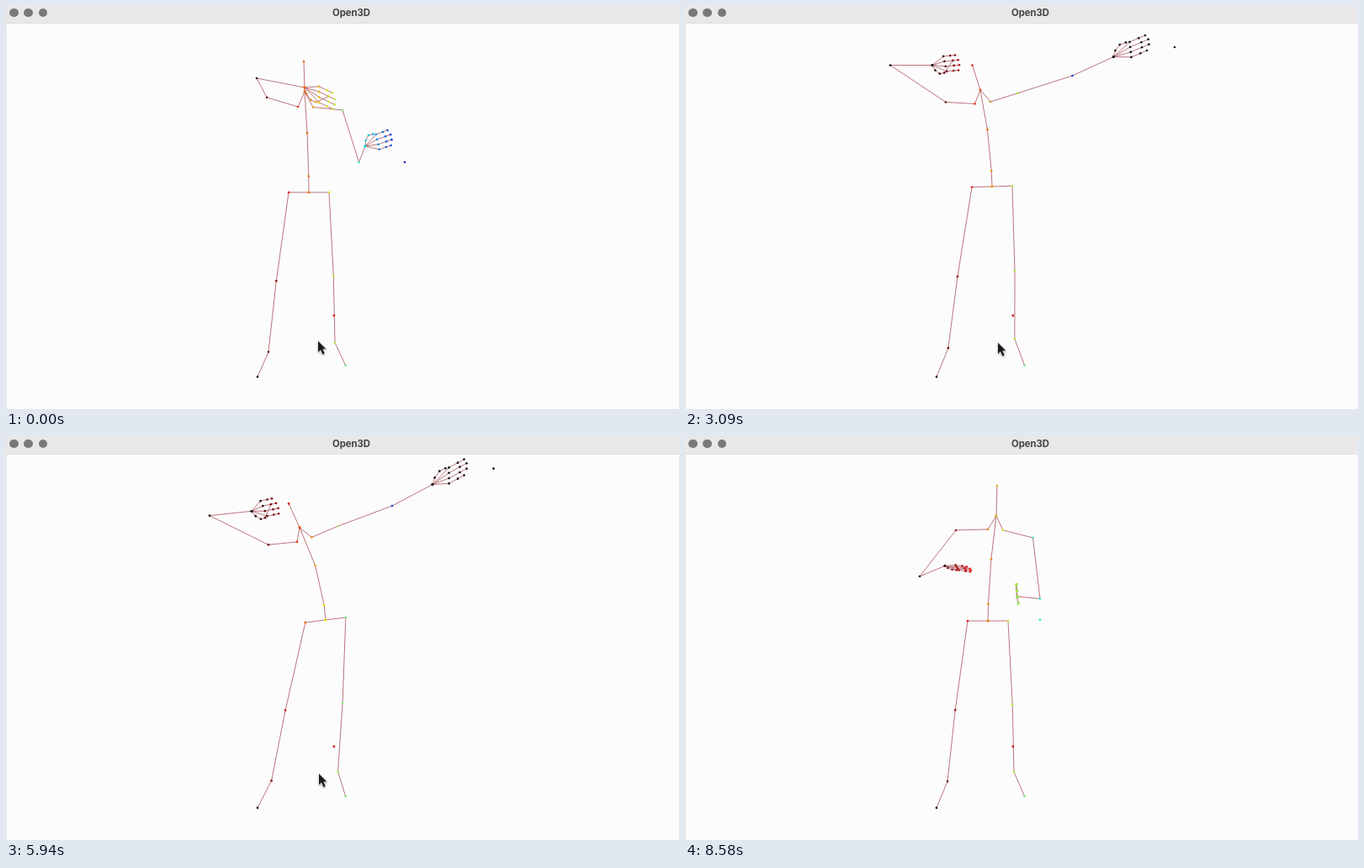
An HTML page with a canvas that plays this animation: 800 px wide and 480 px high, repeating every 8610 ms.

```html
<!DOCTYPE html>
<html lang="en">
<head>
<meta charset="utf-8">
<title>Skeleton viewer</title>
<style>
html, body { margin: 0; width: 100%; height: 100%; overflow: hidden; background: #fcfcfc; }
#stage { position: relative; width: 800px; height: 480px; overflow: hidden; }
canvas { position: absolute; left: 0; top: 0; }
#bar { position: absolute; left: 0; top: 0; width: 800px; height: 20px; background: #e9e7e7; border-bottom: 1px solid #e0dede; }
#bar i { position: absolute; top: 2.6px; width: 10.8px; height: 10.8px; border-radius: 50%; background: #7a7878; }
#bar b { position: absolute; left: 310px; width: 201px; top: 0; text-align: center; font: bold 11.3px/16px Inter, Roboto, sans-serif; color: #434242; }
#edge { position: absolute; left: 0; top: 21px; width: 1px; height: 459px; background: #e6e6e6; }
#cursor { position: absolute; filter: drop-shadow(0 1px 1px rgba(0,0,0,.35)); overflow: visible; }
</style>
</head>
<body>
<div id="stage">
  <canvas id="view" width="800" height="480"></canvas>
  <div id="edge"></div>
  <svg id="cursor" width="12" height="18"><path d="M0 0V13.2L3 10.5L5.4 16L7.8 15L5.4 9.6H9.5Z" fill="#1c1c1c" stroke="#fff" stroke-width="1" paint-order="stroke"/></svg>
  <div id="bar"><i style="left:4px"></i><i style="left:21.3px"></i><i style="left:38.5px"></i><b>Open3D</b></div>
</div>
<script>
const LOOP = 8610, STEP = 30;
const ctx = document.getElementById('view').getContext('2d');
const cursor = document.getElementById('cursor');

// A pose holds the trunk, both arms from collar to wrist (the right one ends in
// a loose marker) and each hand as its finger vector and its half width.
const start = {
  head: [354, 66], neck: [355, 102], pelvis: [360, 222],
  left: [[347, 120], [310, 109], [298, 86], [355, 97]], leftHand: [[33, 16], [0, 9.5]],
  right: [[365, 120.5], [400, 124], [419.5, 186], [427, 167], [474, 186]], rightHand: [[28.5, -10], [-2, -9]]
};
const raised = {
  head: [345, 63], neck: [352, 88], pelvis: [359, 211],
  left: [[344, 104], [310, 86], [301, -5], [330, -35]], leftHand: [[29, -3], [2, 9]],
  right: [[363, 104], [392, 86], [452, 40], [488, 0], [545, -45]], rightHand: [[38, -22], [0, -9]]
};
const wide = {
  head: [341.5, 70.5], neck: [351, 100], pelvis: [365, 215],
  left: [[344.5, 116.5], [310, 114.5], [244, 70.5], [294, 70.5]], leftHand: [[29, -3], [2, 9]],
  right: [[363, 114], [395, 104], [460.5, 83], [509.5, 60.5], [582, 49]], rightHand: [[38.5, -16.5], [-1, -9]]
};
const leaning = {
  head: [336, 79.5], neck: [349, 108], pelvis: [380, 218],
  left: [[346, 125], [312, 128.5], [242, 94], [292, 88.5]], leftHand: [[28, -6], [4, 9]],
  right: [[363.5, 119.5], [395, 106], [459, 82], [507, 56.5], [579.5, 37.5]], rightHand: [[37.5, -20.5], [0, -9.5]]
};
const lowered = {
  head: [371, 58], neck: [370, 94], pelvis: [360, 219],
  left: [[360, 110], [322, 111], [279, 166], [309, 153.5]], leftHand: [[28, 4], [2, 3]],
  right: [[378, 111], [413.5, 120], [422, 192.5], [394.5, 190], [422, 217.5]], rightHand: [[1, -4], [-1, -11]]
};

const smooth = s => s * s * (3 - 2 * s);
const settle = s => 1 - (1 - s) ** 3;
const moves = [
  { from: start, to: raised, t0: 0, t1: 1850, ease: smooth },
  { from: raised, to: wide, t0: 1850, t1: 3090, ease: smooth },
  { from: wide, to: leaning, t0: 3090, t1: 6790, ease: settle },
  { from: leaning, to: lowered, t0: 7020, t1: 8160, ease: smooth }
];

const mix = (a, b, k) => a + (b - a) * k;
const mixPoint = (p, q, k) => [mix(p[0], q[0], k), mix(p[1], q[1], k)];
const add = (p, q, k = 1) => [p[0] + q[0] * k, p[1] + q[1] * k];
const sub = (p, q) => add(p, q, -1);
const clamp = v => Math.max(0, Math.min(1, v));

// Turns one vector into another by angle and length, the short way round.
function swing(u, v, k) {
  const a = Math.atan2(u[1], u[0]), d = Math.atan2(v[1], v[0]) - a;
  const ang = a + Math.atan2(Math.sin(d), Math.cos(d)) * k;
  const len = mix(Math.hypot(...u), Math.hypot(...v), k);
  return [len * Math.cos(ang), len * Math.sin(ang)];
}

function arm(side, from, to, k, neck) {
  let p = neck;
  return from[side].map((q, i) => {
    const u = sub(q, from[side][i - 1] || from.neck);
    const v = sub(to[side][i], to[side][i - 1] || to.neck);
    return p = add(p, swing(u, v, k));
  });
}

function line(...pts) {
  ctx.beginPath();
  pts.forEach(p => ctx.lineTo(...p));
  ctx.stroke();
}

// Points take the jet colour map from left to right.
function dot([x, y]) {
  const v = 4 * (.88 - (x - 337) * .0058);
  const rgb = [3, 2, 1].map(peak => Math.round(20 + 210 * clamp(1.5 - Math.abs(v - peak))));
  ctx.fillStyle = `rgb(${rgb})`;
  ctx.beginPath();
  ctx.arc(x, y, 1.35, 0, 7);
  ctx.fill();
}

function chain(...pts) {
  line(...pts);
  pts.forEach(dot);
}

function hand(wrist, [along, across], linked) {
  const spot = (a, c) => add(add(wrist, along, a), across, c);
  const thumb = [spot(.07, .7), spot(.22, 1.2), spot(.41, 1.15)];
  const fingers = [1, 1 / 3, -1 / 3, -1].map(c => {
    const reach = 1.09 - .09 * c * c;
    return [.52, .8 * reach, reach].map(a => spot(a, c));
  });
  if (linked) line(thumb[2], fingers[2][1]);
  [thumb, ...fingers].forEach(f => chain(wrist, ...f));
}

// The legs follow the pelvis while the toes stay planted.
function leg(pelvis, side, ankleX, ankleY, toe) {
  const shift = pelvis[0] - 360;
  const hip = add(pelvis, [24, -.15 * shift], side);
  const ankle = [ankleX + .18 * shift, ankleY + .65 * (pelvis[1] - 222)];
  const knee = add(mixPoint(hip, ankle, .555), [1.4 * side, 0]);
  chain(pelvis, hip, knee, ankle, toe);
}

function trunk(head, neck, pelvis) {
  const bow = (pelvis[0] - neck[0]) / 5;
  const spine = [.41, .84].map(s => add(mixPoint(neck, pelvis, s), [4 * s * (1 - s) * bow, 0]));
  chain(head, neck, ...spine, pelvis);
}

function draw(t) {
  const { from, to, t0, t1, ease } = moves.findLast(m => t >= m.t0);
  const k = ease(clamp((t - t0) / (t1 - t0)));
  const [head, neck, pelvis] = ['head', 'neck', 'pelvis'].map(n => mixPoint(from[n], to[n], k));
  const [leftHand, rightHand] = ['leftHand', 'rightHand'].map(n =>
    from[n].map((p, i) => mixPoint(p, to[n][i], k)));
  const left = arm('left', from, to, k, neck);
  const right = arm('right', from, to, k, neck);
  const marker = right.pop();

  ctx.clearRect(0, 0, 800, 480);
  ctx.strokeStyle = '#ba747b';
  trunk(head, neck, pelvis);
  leg(pelvis, -1, 312, 412, [299, 441.7]);
  leg(pelvis, 1, 391, 401, [403.6, 428]);
  chain(neck, ...left);
  chain(neck, ...right);
  hand(left[3], leftHand, true);
  hand(right[3], rightHand, false);
  dot(marker);
  ctx.fillStyle = '#d31c1c';
  ctx.fillRect(388.6, 367.4, 2.5, 2.5);

  const moved = t >= 600;
  cursor.style.left = (moved ? 372 : 370.5) + 'px';
  cursor.style.top = (moved ? 401 : 399) + 'px';
  cursor.style.visibility = t < 6000 ? 'visible' : 'hidden';
}

const began = performance.now();
function tick() {
  const t = (performance.now() - began) % LOOP;
  draw(Math.floor(t / STEP) * STEP);
  requestAnimationFrame(tick);
}
tick();
</script>
</body>
</html>
```
